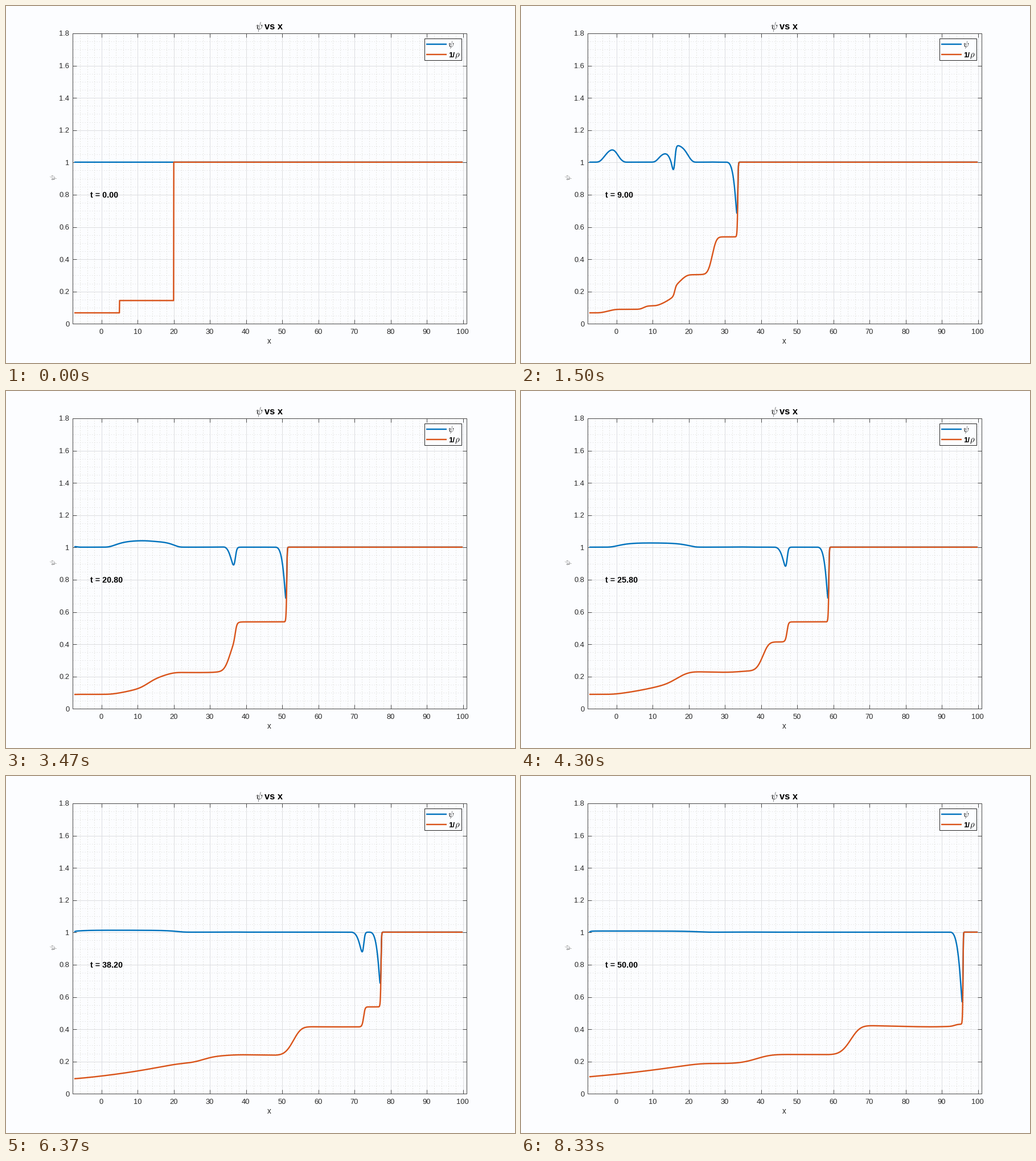
A matplotlib script that plays this animation: 894 by 626 pixels, repeating every 8360 ms.

```python
import numpy as np
import matplotlib.pyplot as plt
from matplotlib.animation import FuncAnimation
from matplotlib.patches import Rectangle

plt.rcParams["font.family"] = "Liberation Sans"
plt.rcParams["mathtext.fontset"] = "cm"

W, H, DPI = 894, 626, 100
FRAMES, LOOP, T_STEP = 251, 8360, 0.2
L, R, TOP, BOT = 116.7, 808.5, 47.4, 556.9
BG, INK = "#fcfdff", "#262626"
BLUE, RED = "#0072bd", "#d95319"
GAMMA, CELLS, SUBSTEPS = 1.4, 1800, 18


def px(x):
    return L + (np.asarray(x) + 8) / 109 * (R - L)


def py(y):
    return BOT - np.asarray(y) / 1.8 * (BOT - TOP)


def pt(pixels):
    return pixels * 72 / DPI


def relax(psi, rho, dt):
    """Pull psi back to 1, faster in thin gas and for small deviations."""
    dev = np.log(psi)
    rate = 1.6 / rho + 0.19 / np.sqrt(np.abs(dev) + 1e-4)
    return np.exp(dev * np.exp(-rate * dt))


# --- gas flow with a relaxing ratio psi, carried as q = rho^2 psi ---
def simulate():
    x = np.linspace(-7.5, 100, CELLS)
    dx, dt = x[1] - x[0], T_STEP / SUBSTEPS
    rho = np.where(x < 5, 15.0, np.where(x < 20, 7.0, 1.0))
    state = np.array([rho, 0 * x, rho / GAMMA / (GAMMA - 1), rho**2])
    history = []
    for _ in range(FRAMES):
        rho = state[0]
        history.append((state[3] / rho**2, 1 / rho))
        for _ in range(SUBSTEPS):
            full = np.concatenate([state[:, :1], state, state[:, -1:]], axis=1)
            rho, mom, energy, _q = full
            u = mom / rho
            p = (GAMMA - 1) * (energy - 0.5 * mom * u)
            speed = np.abs(u) + np.sqrt(GAMMA * p / rho)
            flux = full * u
            flux[1] += p
            flux[2] += p * u
            a = np.maximum(speed[1:], speed[:-1])
            face = 0.5 * (flux[:, 1:] + flux[:, :-1] - a * (full[:, 1:] - full[:, :-1]))
            state = state - dt / dx * (face[:, 1:] - face[:, :-1])
            sq = state[0] ** 2
            state[3] = sq * relax(state[3] / sq, state[0], dt)
    return x, history


x, history = simulate()

fig = plt.figure(figsize=(W / DPI, H / DPI), dpi=DPI, facecolor=BG)
ax = fig.add_axes([0, 0, 1, 1])
ax.set_xlim(0, W)
ax.set_ylim(H, 0)
ax.axis("off")


def mid(v):
    return np.floor(v) + 0.5


def segments(segs, color, width=1.0, z=1, **kw):
    xs, ys = [], []
    for x0, y0, x1, y1 in segs:
        xs += [x0, x1, np.nan]
        ys += [y0, y1, np.nan]
    ax.plot(xs, ys, color=color, lw=pt(width), zorder=z,
            solid_capstyle="butt", dash_capstyle="butt", **kw)


def label(x0, y0, s, size, color=INK, **kw):
    return ax.text(x0, y0, s, fontsize=pt(size), color=color, zorder=6, **kw)


# --- grid ---
x_major, y_major = np.arange(0, 101, 10), np.arange(0, 10) * 0.2
x_minor = [v for v in range(-6, 101, 2) if v % 10]
y_minor = [k * 0.05 for k in range(1, 36) if k % 4]
left, right, top, bottom = mid(L), mid(R), mid(TOP), mid(BOT)

segments([(mid(px(v)), bottom, mid(px(v)), top) for v in x_minor],
         "#dcdcd6", dashes=(1.4, 2.8))
segments([(left, mid(py(v)), right, mid(py(v))) for v in y_minor],
         "#e2e2e2", dashes=(1.4, 2.8))
segments([(mid(px(v)), bottom, mid(px(v)), top) for v in x_major], "#dcdde0", z=2)
segments([(left, mid(py(v)), right, mid(py(v))) for v in y_major[1:-1]],
         "#dcdde0", z=2)

# --- frame, ticks and their numbers ---
ticks = []
for v in x_major:
    c = mid(px(v))
    ticks += [(c, bottom, c, bottom - 7), (c, top, c, top + 7)]
    label(px(v), 574.8, str(v), 12.9, ha="center")
for v in y_major:
    c = mid(py(v))
    ticks += [(left, c, left + 7, c), (right, c, right - 7, c)]
    label(111.3, py(v) + 4.9, f"{v:.1f}".replace(".0", ""), 12.9, ha="right")
segments(ticks, "#484848", z=3)
ax.add_patch(Rectangle((left, top), right - left, bottom - top, fill=False,
                       ec="#484848", lw=pt(1), zorder=3))

# --- titles ---
label(437.5, 41, r"$\psi$", 17.5, "black")
label(454, 41, "vs x", 16.5, "black", weight="bold")
label(462.3, 592, "x", 13.5, ha="center")
label(84, 301, r"$\psi$", 13.5, "#505050", rotation=90, ha="center", va="center")

# --- curves ---
area = Rectangle((L, TOP), R - L, BOT - TOP, transform=ax.transData)
curves = []
for color, z in ((BLUE, 4), (RED, 5)):
    line, = ax.plot([], [], color=color, lw=pt(2.4), zorder=z,
                    solid_joinstyle="round", solid_capstyle="butt")
    line.set_clip_path(area)
    curves.append(line)
clock = label(148, 336.3, "", 14.3, "black", weight="bold")

# --- legend ---
ax.add_patch(Rectangle((734.5, 56.5), 65, 38, fc=BG, ec=INK, lw=pt(1), zorder=5.5))
segments([(738, 67, 774, 67)], BLUE, 2.4, 6)
segments([(738, 85, 774, 85)], RED, 2.4, 6)
label(776.5, 72, r"$\psi$", 14.5, "black")
label(777, 90, "1/", 13.2, "black", weight="bold")
label(788, 90, r"$\rho$", 14.5, "black")

xs = px(x)


def draw(i):
    for line, values in zip(curves, history[i]):
        line.set_data(xs, py(values))
    clock.set_text(f"t = {i * T_STEP:.2f}")
    return (*curves, clock)


anim = FuncAnimation(fig, draw, frames=FRAMES, interval=LOOP / FRAMES,
                     repeat=True, repeat_delay=0, blit=False)
plt.show()
```
